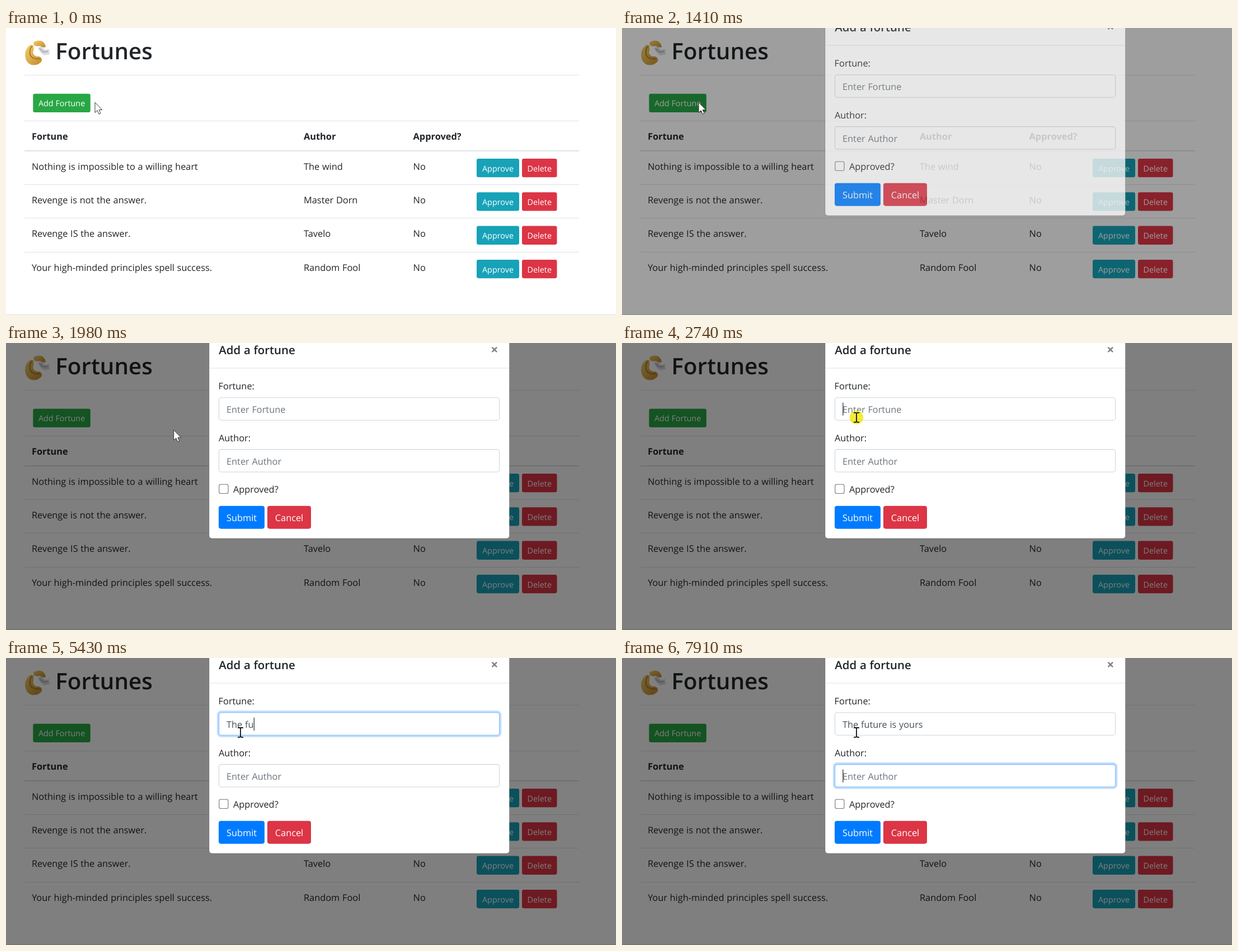
Write an HTML page that moves like this. It is 1090x514 px and loops after 8000 ms.

```html
<!DOCTYPE html>
<html lang="en">
<head>
<meta charset="utf-8">
<title>Fortunes</title>
<style>
  html, body { margin: 0; width: 100%; height: 100%; overflow: hidden; background: #fff; }
  svg { display: block; width: 100vw; height: 100vh; }
  text {
    font: 16.35px "Open Sans", "Noto Sans", sans-serif;
    word-spacing: .4px;
    fill: #212529;
    text-rendering: geometricPrecision;
  }
  .h1 { font-size: 40.4px; font-weight: 600; }
  .h5 { font-size: 20.4px; font-weight: 600; }
  .th { font-weight: 700; }
  .close { font-size: 23px; font-weight: 700; fill: #7f7f7f; }
  .label { fill: #fff; text-anchor: middle; word-spacing: 0; }
  .small { font-size: 14.4px; }
  .item { font-size: 13.4px; font-weight: 600; }
  .hint { fill: #6c757d; }
  .value { fill: #495057; }
  .rule { fill: #dee2e6; }
  .field { fill: #fff; stroke: #ced4da; stroke-width: 1.1; }
  .glow { fill: none; stroke: #bfdeff; stroke-width: 3.4; }
  .edge { fill: none; stroke: #80bdff; stroke-width: 1.1; }
  .popup { fill: #fff; stroke: #c4c4c4; filter: drop-shadow(0 1px 1px rgba(0, 0, 0, .25)); }
</style>
</head>
<body>
<svg viewBox="0 0 1090 514" preserveAspectRatio="none">
  <defs>
    <linearGradient id="crust" x1="0" y1="0" x2="1" y2="1">
      <stop offset="0" stop-color="#f2cf6c"/>
      <stop offset="1" stop-color="#c38a2b"/>
    </linearGradient>
  </defs>

  <g id="page">
    <g id="cookie">
      <path d="M57 36 63 32 69 39 77 38 78 47 68 49 62 44Z" fill="#d9dbdf"/>
      <path d="M60 37 67 43 75 42" fill="none" stroke="#a9adb5" stroke-width="2"/>
      <path d="M49 26Q55 21 63 23Q70 26 71 34Q66 36 61 32Q55 34 50 31Z" fill="url(#crust)"/>
      <path d="M44 30Q34 36 34 49Q35 62 45 66Q58 68 64 59Q65 53 59 51Q50 52 48 44Q51 36 48 31Z" fill="url(#crust)"/>
      <path d="M47 32Q41 38 43 48Q47 57 61 55" fill="none" stroke="#9f6b22" stroke-width="1.6"/>
    </g>
    <text class="h1" x="88.3" y="55.7">Fortunes</text>
    <rect x="33" y="84" width="991" height="1" fill="#e3e3e3"/>
    <rect id="addRing" x="46.5" y="115.9" width="106" height="37" rx="5" fill="none" stroke="#93d3a2" stroke-width="3.2"/>
    <rect id="add" x="48.3" y="117.7" width="102.5" height="33.3" rx="3.3"/>
    <text class="label small" x="99.6" y="140.4">Add Fortune</text>
    <rect class="rule" x="33" y="166" width="991" height="1"/>
    <text class="th" x="46" y="200">Fortune</text>
    <text class="th" x="532" y="200">Author</text>
    <text class="th" x="727.6" y="200">Approved?</text>
    <rect class="rule" x="33" y="219" width="991" height="2"/>
    <g id="rows"></g>
    <rect y="513" width="1090" height="1" fill="#dcdcdc"/>
  </g>

  <rect id="dim" width="1090" height="514"/>

  <g id="modal">
    <rect x="363" y="-60" width="536.5" height="410" rx="5" fill="#fff" stroke="#000" stroke-opacity=".2"/>
    <text class="h5" x="380.3" y="19.8">Add a fortune</text>
    <text class="close" x="866.3" y="20">×</text>
    <rect class="rule" x="363.5" y="44.5" width="535.5" height="1"/>
    <text x="379.6" y="83">Fortune:</text>
    <g id="fortune"></g>
    <text x="380" y="175.7">Author:</text>
    <g id="author"></g>
    <rect x="380.8" y="253.3" width="16.2" height="16.2" rx="2.8" fill="#fff" stroke="#767676" stroke-width="1.1"/>
    <text x="406" y="268.3">Approved?</text>
    <g id="actions"></g>
    <text id="hint" class="hint" x="394" y="125.4">Enter Fortune</text>
    <text class="hint" x="394" y="218.2">Enter Author</text>
    <text id="typed" class="value" x="394" y="125.4" xml:space="preserve"></text>
    <rect id="caret" width="1.3" height="23.2" fill="#343a40"/>
  </g>

  <g id="fullList">
    <rect class="popup" x="380" y="139" width="426.5" height="211" rx="3"/>
  </g>
  <g id="shortList">
    <rect class="popup" x="380" y="139" width="77" height="57" rx="3"/>
  </g>

  <circle id="click" r="12.2" fill="#f0e600" fill-opacity=".78"/>
  <path id="arrow" d="M0 0V18.2L4.2 14.4 7.1 20.9 10 19.6 7.2 13.3H12.9Z" fill="#fff" stroke="#222" stroke-width=".9"/>
  <path id="beam" d="M-5 -8.5H-1.5L0 -7.5 1.5 -8.5H5M0 -7.5V7.5M-5 8.5H-1.5L0 7.5 1.5 8.5H5" fill="none" stroke="#111" stroke-width="1.8"/>
</svg>

<script>
const LOOP = 8000;
const $ = id => document.getElementById(id);
const append = (id, markup) => $(id).insertAdjacentHTML('beforeend', markup);

const button = (x, y, w, h, color, label, size = '') =>
  `<rect x="${x}" y="${y}" width="${w}" height="${h}" rx="${h / 10}" fill="${color}"/>
   <text class="label ${size}" x="${x + w / 2}" y="${y + h / 2 + (size ? 6.1 : 7.2)}">${label}</text>`;

const field = y =>
  `<rect class="field" x="380.5" y="${y}" width="501.2" height="40.4" rx="4.3"/>
   <g class="focus">
     <rect class="glow" x="378.6" y="${y - 1.9}" width="505" height="44.2" rx="6"/>
     <rect class="edge" x="380.5" y="${y}" width="501.2" height="40.4" rx="4.3"/>
   </g>`;

[
  ['Nothing is impossible to a willing heart', 'The wind'],
  ['Revenge is not the answer.', 'Master Dorn'],
  ['Revenge IS the answer.', 'Tavelo'],
  ['Your high-minded principles spell success.', 'Random Fool']
].forEach(([fortune, author], i) => {
  const y = 60.3 * i;
  append('rows', `
    ${i ? `<rect class="rule" x="33" y="${Math.round(219.8 + y)}" width="991" height="1"/>` : ''}
    <text x="46" y="${253.8 + y}">${fortune}</text>
    <text x="532" y="${253.8 + y}">${author}</text>
    <text x="727.6" y="${253.8 + y}">No</text>
    ${button(841, 234 + y, 76, 33.3, '#17a2b8', 'Approve', 'small')}
    ${button(922, 234 + y, 62.5, 33.3, '#dc3545', 'Delete', 'small')}`);
});

append('fortune', field(97.8));
append('author', field(190.6));
append('actions', button(380, 291.7, 82, 41, '#007bff', 'Submit') +
                  button(467, 291.7, 78, 41, '#dc3545', 'Cancel'));

const item = (label, i) => `<text class="item" x="393" y="${172.4 + 38.8 * i}">${label}</text>`;
append('fullList', [
  'Test', 'Your life is your own', 'Orin is Bae',
  'Nothing is impossible to a willing heart',
  'Don’t worry about money. The best things in life are free.'
].map(item).join(''));
append('shortList', item('Test', 0));

const MESSAGE = 'The future is yours';
const KEY_TIMES = [4380, 4620, 4860, 5010, 5170, 5430, 5570, 5720, 5870, 5960,
                   6120, 6270, 6450, 6560, 6730, 6880, 6960, 7110, 7350];

// Progress in n equal jumps: the first at `from`, the last at `to`.
const stepped = (t, from, to, n) =>
  t < from ? 0 : Math.min(1, (Math.floor((t - from) / (to - from) * (n - 1) + 1e-6) + 1) / n);
const smooth = p => p * p * (3 - 2 * p);
const within = (t, from, to) => t >= from && t < to;
const show = (id, on) => { $(id).style.display = on ? '' : 'none'; };
const setOpacity = (el, value) => { el.style.opacity = value; };

const MOVES = [
  { from: 230, to: 480, n: 5, dx: -26, dy: 4 },
  { from: 980, to: 1260, n: 5, dx: 4, dy: -4 },
  { from: 1640, to: 2190, n: 8, dx: 238, dy: 33 },
  { from: 2270, to: 2570, n: 5, dx: 44, dy: -33 }
];

function drawPointer(t) {
  let x = 159, y = 133.3;
  for (const m of MOVES) {
    const p = smooth(stepped(t, m.from, m.to, m.n));
    x += m.dx * p;
    y += m.dy * p;
  }
  const overField = x > 380 && y < 138;
  for (const id of ['arrow', 'beam', 'click']) $(id).setAttribute('transform', `translate(${x} ${y})`);
  show('arrow', !overField);
  show('beam', overField);
  show('click', within(t, 980, 1190) || within(t, 2740, 2830));
}

function drawAddButton(t) {
  const hover = t < 1410 ? stepped(t, 290, 480, 4) : 0;
  const mix = (a, b) => Math.round(a + (b - a) * hover);
  $('add').setAttribute('fill', `rgb(${mix(40, 33)},${mix(167, 136)},${mix(69, 56)})`);
  setOpacity($('addRing'), t < 1410 ? stepped(t, 980, 1120, 3) : 0);
}

function drawModal(t) {
  const fade = t < 1410 ? 0 : t < 1490 ? .76 : 1;
  const shift = t < 1490 ? -14 : t < 1560 ? -4 : 0;
  setOpacity($('dim'), fade / 2);
  setOpacity($('modal'), fade);
  $('modal').setAttribute('transform', `translate(0 ${shift})`);

  const focusIn = t < 2830 ? 0 : t < 2890 ? .55 : 1;
  const moved = t < 7750 ? 0 : t < 7830 ? .1 : t < 7910 ? .6 : 1;
  setOpacity($('fortune').querySelector('.focus'), focusIn * (1 - moved));
  setOpacity($('author').querySelector('.focus'), moved);
  show('fullList', within(t, 2890, 4480));
  show('shortList', within(t, 4480, 4620));
}

function drawTyping(t) {
  const count = KEY_TIMES.filter(k => t >= k).length;
  const typed = $('typed'), caret = $('caret');
  typed.textContent = MESSAGE.slice(0, count).replace(/ /g, '\u00a0');
  show('hint', !count);
  const inAuthor = t >= 7750;
  const width = count && !inAuthor ? typed.getComputedTextLength() : 0;
  caret.setAttribute('x', 394.2 + width);
  caret.setAttribute('y', inAuthor ? 199.6 : 106.8);
  show('caret', t >= 2740 && !within(t, 3310, 3820) && !within(t, 4320, 4380));
}

const start = performance.now();
function frame() {
  const t = (performance.now() - start) % LOOP;
  drawPointer(t);
  drawAddButton(t);
  drawModal(t);
  drawTyping(t);
  requestAnimationFrame(frame);
}
frame();
</script>
</body>
</html>
```
